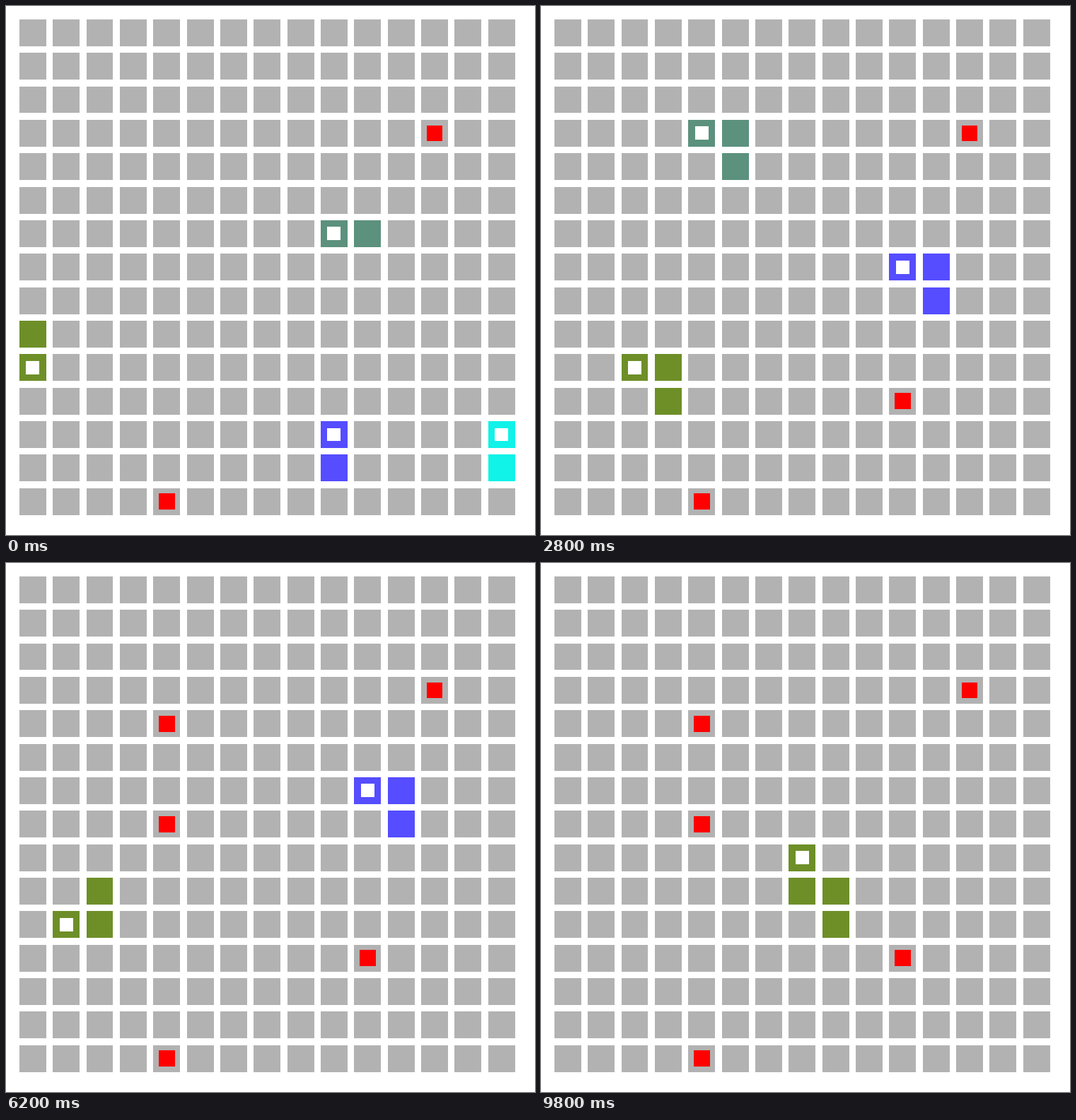
Recreate the animation shown at these times as an HTML page with a canvas. Size 748 px wide and 748 px high, loop 10 s.

```html
<!DOCTYPE html>
<html lang="en">
<head>
<meta charset="utf-8">
<title>Snakes</title>
<style>
  html, body { margin: 0; width: 100%; height: 100%; overflow: hidden; background: #fff; }
  canvas { display: block; }
</style>
</head>
<body>
<canvas id="stage" width="748" height="748"></canvas>
<script>
const ctx = document.getElementById('stage').getContext('2d');
const GRID = 15, STEP_MS = 200, STEPS = 50;
const UNIT = 748 / 15.8;
const MOVES = { U: [0, -1], D: [0, 1], L: [-1, 0], R: [1, 0] };

// One move per step; a snake disappears when its moves run out.
const snakes = [
  { color: '#6e8f28', start: [0, 9], growsAt: 40,
    moves: 'DRRUR DLDLD RURUL DRDLL LDRUU RULUR DLUUU RDRUR RDRDR DRULU' },
  { color: '#554dff', start: [9, 13],
    moves: 'UURUR ULULU RDRUL DLDRD RURUU LDLUR ULDLD LDRDD DRRUR DLDL' },
  { color: '#11f2e8', start: [14, 13], moves: 'UUULL' },
  { color: '#5c917e', start: [10, 6], moves: 'LDLUL ULULU RDLUL ULURD RDRUL' }
];
for (const snake of snakes) {
  snake.path = [snake.start];
  for (const move of snake.moves.replaceAll(' ', '')) {
    const [x, y] = snake.path.at(-1), [dx, dy] = MOVES[move];
    snake.path.push([x + dx, y + dy]);
  }
}

// Cell, step of appearance, step of being eaten
const foods = [
  [12, 3, 0, STEPS], [4, 14, 0, STEPS], [10, 11, 9, STEPS],
  [4, 4, 19, STEPS], [4, 7, 29, 39], [4, 7, 49, STEPS]
];

// Square centred in a grid cell, with edges on whole pixels
function square(x, y, size, color) {
  const edge = (cell, side) => Math.round((cell + 0.8 + side * size / 2) * UNIT);
  const left = edge(x, -1), top = edge(y, -1);
  ctx.fillStyle = color;
  ctx.fillRect(left, top, edge(x, 1) - left, edge(y, 1) - top);
}

function draw(step) {
  ctx.fillStyle = '#fff';
  ctx.fillRect(0, 0, 748, 748);
  for (let y = 0; y < GRID; y++)
    for (let x = 0; x < GRID; x++) square(x, y, 0.8, '#b2b2b2');

  for (const [x, y, from, to] of foods)
    if (step >= from && step < to) square(x, y, 0.48, '#f00');

  for (const { path, color, growsAt = STEPS } of snakes) {
    const head = step + 1;
    if (head >= path.length) continue;
    const length = step >= growsAt ? 4 : 3;
    for (const [x, y] of path.slice(Math.max(0, head - length + 1), head + 1))
      square(x, y, 0.8, color);
    square(...path[head], 0.4, '#fff');
  }
}

const began = performance.now();
function tick() {
  draw(Math.floor((performance.now() - began) / STEP_MS) % STEPS);
  requestAnimationFrame(tick);
}
tick();
</script>
</body>
</html>
```
